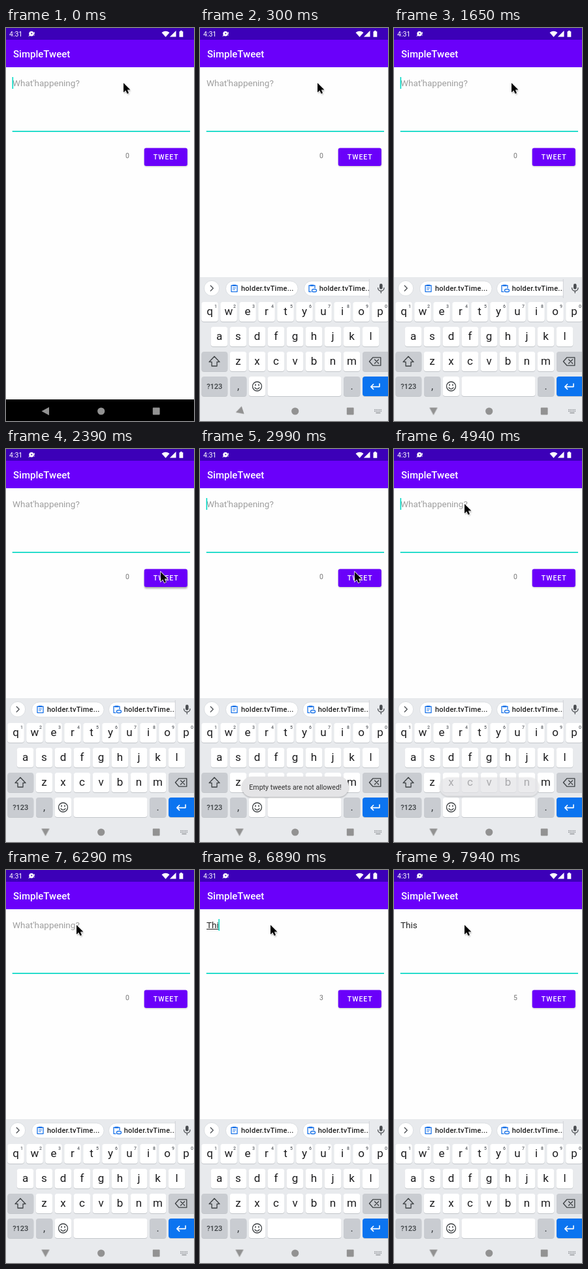
Write an HTML page that moves like this. It is 288 px wide and 601 px high and loops after 8 s.

```html
<!DOCTYPE html>
<html lang="en">
<head>
<meta charset="utf-8">
<title>SimpleTweet</title>
<style>
  html, body { margin: 0; width: 100%; height: 100%; overflow: hidden; background: #fefefe; }
  svg { display: block; width: 288px; height: 601px; font-family: Roboto, sans-serif; }
  .mid { text-anchor: middle; }
  .med { font-weight: 500; }
  .chip { fill: #fff; stroke: #d5d8dc; stroke-width: .8; }
  .line { fill: none; stroke-width: 1.3; stroke-linejoin: round; stroke-linecap: round; }
  .key { font-size: 17px; fill: #1c1c1e; }

  /* Every state holds until the next one: 1% is 80 ms. */
  .anim { animation: 8s step-end infinite; }
  #keyboard { animation-name: keyboard; }
  #back { animation-name: back; transform-origin: 60.5px 586px; }
  #chip2 { animation-name: chip; }
  #caret { animation-name: blink, caretMove; }
  #hint { animation-name: hint; }
  #reveal { animation-name: reveal; }
  #composing { animation-name: composing; }
  #digits { animation-name: digits; }
  #lower { animation-name: lower; }
  #upper { animation-name: upper; }
  #lift { animation-name: lift; }
  #ripple { animation-name: ripple; }
  #toast { animation-name: toast; transform-origin: 146px 516.5px; }
  #message { animation-name: message; }
  #pointer { animation-name: pointer; }

  @keyframes keyboard { 0% { opacity: 0 } 3.7%, 100% { opacity: 1 } }
  @keyframes back {
    0% { transform: none }
    3.7% { transform: rotate(-18deg) }
    5.6%, 100% { transform: rotate(-90deg) }
  }
  @keyframes chip { 0% { transform: translateX(2px) } 5.6%, 100% { transform: none } }
  @keyframes blink {
    0%, 9.3%, 20.6%, 33.6%, 46.7%, 59.8%, 72.9%, 84.2% { opacity: 1 }
    3.7%, 14.9%, 27.9%, 39.2%, 52.3%, 65.4%, 78.6%, 99.2%, 100% { opacity: 0 }
  }
  @keyframes caretMove {
    0% { transform: none }
    84.2% { transform: translateX(8px) }
    86.1% { transform: translateX(18.8px) }
    87.9% { transform: translateX(25.7px) }
    89.8%, 100% { transform: translateX(29px) }
  }
  @keyframes hint { 0% { opacity: 1 } 84.2%, 100% { opacity: 0 } }
  @keyframes reveal {
    0% { width: 0 }
    84.2% { width: 9px }
    86.1% { width: 19.8px }
    87.9%, 100% { width: 28px }
  }
  @keyframes composing { 0% { opacity: 1 } 93.6%, 100% { opacity: 0 } }
  @keyframes digits {
    0% { transform: none }
    84.2% { transform: translateY(-20px) }
    86.1% { transform: translateY(-40px) }
    87.9% { transform: translateY(-60px) }
    89.8%, 100% { transform: translateY(-80px) }
  }
  @keyframes lower { 0%, 84.2%, 100% { opacity: 1 } 82.3% { opacity: 0 } }
  @keyframes upper { 0%, 84.2%, 100% { opacity: 0 } 82.3% { opacity: 1 } }
  @keyframes lift { 0%, 37.3%, 100% { opacity: 0 } 29.8% { opacity: 1 } }
  @keyframes ripple {
    0%, 37.3%, 100% { opacity: 0 }
    31.7% { opacity: .2 }
    33.6% { opacity: .14 }
    35.5% { opacity: .06 }
  }
  @keyframes toast {
    0%, 65.4%, 100% { opacity: 0; transform: scale(.9) }
    31.7% { opacity: .4; transform: scale(.95) }
    33.6% { opacity: 1; transform: none }
    59.8% { opacity: .95; transform: scale(.98) }
    61.7% { opacity: .72; transform: scale(.93) }
    63.6% { opacity: .25; transform: scale(.9) }
  }
  @keyframes message {
    0%, 61.7%, 100% { opacity: 0 }
    33.6% { opacity: .6 }
    35.5% { opacity: 1 }
    59.8% { opacity: .4 }
  }
  @keyframes pointer {
    0% { transform: translate(180px, 84px) }
    22.5% { transform: translate(185px, 92px) }
    24.3% { transform: translate(202px, 124px) }
    26.2% { transform: translate(223px, 162px) }
    27.9% { transform: translate(235px, 184px) }
    29.8% { transform: translate(237px, 188px) }
    41.1% { transform: translate(231px, 184px) }
    43% { transform: translate(212px, 172px) }
    44.8% { transform: translate(172px, 145px) }
    46.7% { transform: translate(131px, 111px) }
    48.6% { transform: translate(107px, 83px) }
    54.2%, 100% { transform: translate(108px, 84px) }
  }
</style>
</head>
<body>
<svg viewBox="0 0 288 601">
  <defs>
    <clipPath id="typed"><rect id="reveal" class="anim" x="9" y="70" width="0" height="26"/></clipPath>
    <clipPath id="counter"><rect x="176" y="186" width="20" height="17"/></clipPath>
    <clipPath id="strip"><rect x="0" y="381" width="259" height="36"/></clipPath>
    <filter id="soft" x="-30%" y="-30%" width="160%" height="170%"><feGaussianBlur stdDeviation="1.3"/></filter>
    <g id="clipboard" class="line" stroke="#1a73e8">
      <path d="M1 2.2h9v9.6h-9z"/>
      <path d="M3.6 2.2h3.8" stroke-width="2.6"/>
    </g>
  </defs>

  <rect width="288" height="601" fill="#fefefe"/>

  <!-- Status bar and title -->
  <rect width="288" height="18" fill="#3c00b8"/>
  <rect y="18" width="288" height="42" fill="#6a00fa"/>
  <g fill="#fff">
    <text x="5" y="13" font-size="10.5">4:31</text>
    <circle cx="39" cy="8.7" r="3.8"/>
    <path d="M34 12.8l3-3 1.5 2z"/>
    <path d="M43.4 6v3.4M43.4 10.6v1" stroke="#fff" stroke-width=".9"/>
    <circle cx="39.3" cy="8.5" r="1" fill="#3c00b8"/>
    <path d="M238.5 7q6-4.6 12 0l-6 6.8z"/>
    <path d="M260.5 4v9.6h-9.6z"/>
    <path d="M265.5 5.2h1.6v-1.2h2.6v1.2h1.6v8.6h-5.8z"/>
    <text x="11" y="45" font-size="15" class="med">SimpleTweet</text>
  </g>

  <!-- Compose form -->
  <text id="hint" class="anim" x="10" y="89" font-size="13.5" fill="#9e9e9e">What'happening?</text>
  <g clip-path="url(#typed)">
    <text x="10" y="89" font-size="13.5" fill="#202020">This</text>
    <path id="composing" class="anim" d="M10 90.5h26" stroke="#202020"/>
  </g>
  <rect id="caret" class="anim" x="9.5" y="75" width="1.6" height="18" fill="#03dac5"/>
  <path d="M9.7 158.1h272.3" stroke="#0bd8c6" stroke-width="1.6"/>
  <g clip-path="url(#counter)">
    <g id="digits" class="anim mid" font-size="10.5" fill="#757575">
      <text x="186" y="198.5">0</text>
      <text x="186" y="218.5">1</text>
      <text x="186" y="238.5">3</text>
      <text x="186" y="258.5">4</text>
      <text x="186" y="278.5">5</text>
    </g>
  </g>
  <rect x="212" y="185" width="66" height="27" rx="3" opacity=".22" filter="url(#soft)"/>
  <rect id="lift" class="anim" x="212" y="187" width="66" height="27" rx="3" fill-opacity=".2" filter="url(#soft)"/>
  <rect x="211.7" y="183.6" width="66.2" height="27.4" rx="3" fill="#6a00fa"/>
  <rect id="ripple" class="anim" x="211.7" y="183.6" width="66.2" height="27.4" rx="3" fill="#fff"/>
  <text x="225.8" y="201.3" font-size="10.5" letter-spacing=".94" class="med" fill="#fff">TWEET</text>

  <rect y="568" width="288" height="33"/>

  <g id="keyboard" class="anim">
    <rect y="381" width="288" height="220" fill="#e8eaed"/>

    <!-- Clipboard suggestions -->
    <circle cx="18" cy="398" r="11.6" class="chip"/>
    <path d="M16.2 394l4 4-4 4" class="line" stroke="#4a4d51"/>
    <g clip-path="url(#strip)" font-size="11" letter-spacing=".25" class="med" fill="#1f1f1f">
      <rect x="39.5" y="387" width="110.5" height="23" rx="11.5" class="chip"/>
      <use href="#clipboard" x="47" y="391.5"/>
      <path d="M50.5 397.5h4M50.5 400h3" class="line" stroke="#1a73e8" style="stroke-width:1"/>
      <text x="63" y="402.3">holder.tvTime...</text>
      <g id="chip2" class="anim">
        <rect x="157.5" y="387" width="120" height="23" rx="11.5" class="chip"/>
        <use href="#clipboard" x="164" y="391.5"/>
        <rect x="168" y="398" width="9.5" height="6.5" rx="3" fill="#fff"/>
        <rect x="169.5" y="399.5" width="7" height="4" rx="2" class="line" stroke="#1a73e8"/>
        <text x="180.7" y="402.3">holder.tvTime...</text>
      </g>
    </g>
    <path d="M259.3 384v29" stroke="#d0d3d7"/>
    <rect x="275" y="391" width="4.6" height="8.6" rx="2.3" fill="#4a4d51"/>
    <path d="M272.6 397.5a4.7 4.7 0 0 0 9.4 0M277.3 402.4v2.6" class="line" stroke="#4a4d51"/>

    <g id="caps"></g>
    <g id="lower" class="anim mid key"></g>
    <g id="upper" class="anim mid key" opacity="0"></g>
    <g id="numbers" class="mid med" font-size="7" fill="#5f6368"></g>

    <!-- Function keys -->
    <g class="line" stroke="#3c4043">
      <path id="shift" d="M22 502.3l-8 8.4h4v6.3h8v-6.3h4z"/>
      <path d="M265 503.8h11.8v12.4h-11.8l-5.6-6.2z"/>
      <path d="M267.6 507l6 6m0-6l-6 6"/>
      <circle cx="87.5" cy="548" r="7"/>
      <path d="M84 550q3.5 4.4 7 0"/>
      <path d="M85 545.7v.3M90 545.7v.3" stroke-width="2"/>
      <path d="M275 544v4.6h-13m3.6-3.8l-3.8 3.8 3.8 3.8" stroke="#fff" style="stroke-width:1.6"/>
    </g>
    <g class="mid" fill="#3c4043">
      <text x="22.3" y="552" font-size="11" class="med">?123</text>
      <text x="58.5" y="553" font-size="16">,</text>
      <text x="232.7" y="553" font-size="16">.</text>
    </g>
    <g fill="none" stroke="#93969a" stroke-width="1.4" stroke-dasharray="1.5 .9">
      <path d="M267 583.6h11.5M267 586h11.5"/>
      <path d="M269.4 588.6h7" stroke-dasharray="none"/>
    </g>
  </g>

  <!-- Navigation buttons -->
  <g fill="#929292">
    <path id="back" class="anim" d="M54.5 586l11.5-6.2v12.4z"/>
    <circle cx="145.7" cy="586" r="5.6"/>
    <rect x="224.8" y="580.6" width="10.8" height="10.8" rx=".8"/>
  </g>

  <g id="toast" class="anim" opacity="0">
    <rect x="64" y="502.2" width="164" height="31" rx="15.5" opacity=".25" filter="url(#soft)"/>
    <rect x="64" y="501" width="164" height="31" rx="15.5" fill="#e4e4e6"/>
    <text id="message" class="anim mid" x="146" y="520.6" font-size="10.6" fill="#303030">Empty tweets are not allowed!</text>
  </g>

  <g id="pointer" class="anim">
    <path d="M1 2v14.5l3.4-3.1 2.2 4.8 2.4-1-2.1-4.7h4.6z" opacity=".35" filter="url(#soft)"/>
    <path d="M0 0v14.6l3.4-3.1 2.2 5 2.4-1-2.1-4.9h4.6z" stroke="#fff" stroke-width="1.4" paint-order="stroke"/>
  </g>
</svg>
<script>
  const get = id => document.getElementById(id);

  function add(parent, tag, attrs, text = '') {
    const el = document.createElementNS('http://www.w3.org/2000/svg', tag);
    for (const name in attrs) el.setAttribute(name, attrs[name]);
    el.textContent = text;
    get(parent).append(el);
  }

  function cap(x, y, width, fill = '#fff') {
    const box = { x, width, height: 30, rx: 4 };
    add('caps', 'rect', { ...box, y: y + 1, fill: '#c3c6ca' });
    add('caps', 'rect', { ...box, y, fill });
  }

  // Letter rows: characters, centre of the first key, top edge
  const rows = [['qwertyuiop', 15, 419], ['asdfghjkl', 29.5, 457], ['zxcvbnm', 58.5, 495]];
  for (const [letters, start, top] of rows) {
    [...letters].forEach((letter, i) => {
      const x = start + i * 29;
      cap(x - 12.8, top, 25.6);
      add('lower', 'text', { x, y: top + 20.3 }, letter);
      add('upper', 'text', { x, y: top + 20.3 }, letter.toUpperCase());
      if (top === 419) add('numbers', 'text', { x: x + 9, y: 427.5 }, (i + 1) % 10);
    });
  }
  add('upper', 'path', { d: get('shift').getAttribute('d'), fill: '#3c4043' });

  const grey = '#c9ccd1';
  cap(2.3, 495, 40, grey);
  cap(249, 495, 42, grey);
  cap(2.3, 533, 40, grey);
  cap(46, 533, 25.4, grey);
  cap(74.8, 533, 25.4);
  cap(103.5, 533, 113);
  cap(220, 533, 25.4, grey);
  cap(249, 533, 42, '#0b74f0');
</script>
</body>
</html>
```
